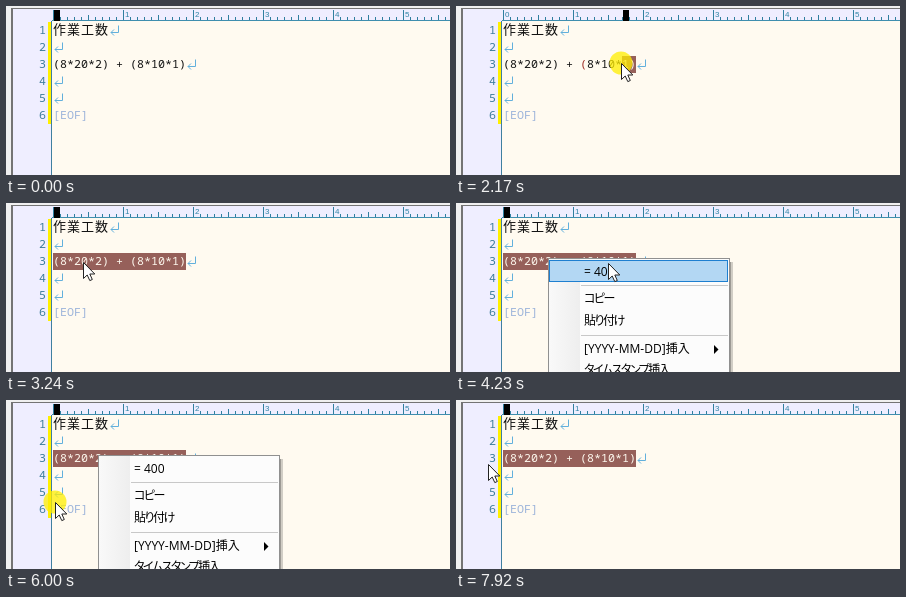
Write an HTML page that moves like this. It is 444 px wide and 169 px high and loops after 8000 ms.

```html
<!DOCTYPE html>
<html lang="ja">
<meta charset="utf-8">
<title>Editor calculation</title>
<style>
  html, body { margin: 0; width: 100%; height: 100%; overflow: hidden; }
  svg { display: block; width: 444px; height: 169px; }
  text { white-space: pre; }
  .code { font: 11.67px "Noto Sans Mono", "DejaVu Sans Mono", monospace; }
  .heading { font: 13px "Noto Sans CJK JP", sans-serif; letter-spacing: 1px; }
  .ruler { font: 8px "Liberation Sans", sans-serif; fill: #2f83a5; }
  .menu { font: 12px "Open Sans", "Noto Sans CJK JP", sans-serif; }
  .kana { font-feature-settings: "palt"; letter-spacing: -1.5px; }
</style>
<svg viewBox="0 0 444 169">
  <defs>
    <clipPath id="clip"><rect id="clipRect" y="50" height="17"/></clipPath>
    <linearGradient id="iconColumn">
      <stop stop-color="#f9f9f9"/><stop offset="1" stop-color="#eeeeee"/>
    </linearGradient>
    <path id="eol" d="M8.5-4.5V2.5H1M4-.5L1 2.5L4 5.5" fill="none" stroke="#62b0dc"/>
  </defs>

  <rect width="444" height="169" fill="#f0f0f0"/>
  <rect x="5" y="2" width="439" height="167" fill="#747474"/>
  <rect x="7" y="3" width="437" height="166" fill="#efeeff"/>
  <rect x="46" y="15" width="398" height="154" fill="#fffaf0"/>
  <rect x="42" y="16" width="3" height="102" fill="#fff000"/>
  <rect x="45" y="15" width="1" height="154" fill="#3f7f9f"/>
  <g id="ruler"></g>
  <rect id="column" y="4" width="6" height="11"/>

  <g id="lines" class="code"></g>
  <rect id="underline" x="47" width="397" height="1" fill="#96605a"/>
  <rect id="selection" y="50" height="17" fill="#96605a"/>
  <text class="code" x="47" y="62" fill="#fffaf0" clip-path="url(#clip)">(8*20*2) + (8*10*1)</text>
  <rect id="caret" width="2" height="15"/>

  <g id="menu" class="menu">
    <path d="M96 59H277V169H96Z" fill="#000" opacity=".18"/>
    <path d="M96 59H275V169H96Z" fill="#000" opacity=".25"/>
    <rect x="92.5" y="55.5" width="181" height="130" fill="#fcfcfc" stroke="#909090"/>
    <rect x="93" y="56" width="31" height="113" fill="url(#iconColumn)"/>
    <path d="M125 82.5H272M125 132.5H272" stroke="#c8c8c8"/>
    <rect id="hover" x="93.5" width="178" fill="#b3d7f3" stroke="#1e7fd0"/>
    <text x="128" y="73">= 400</text>
    <text x="128" y="100" class="kana">コピー</text>
    <text x="128" y="122" class="kana">貼り付け</text>
    <text x="128" y="150">[YYYY-MM-DD]挿入</text>
    <text x="128" y="171" class="kana">タイムスタンプ挿入</text>
    <path d="M258 142L262.5 146.5L258 151Z"/>
  </g>

  <g id="pointer">
    <circle id="click" r="11.5" fill="#ffee00" opacity=".75"/>
    <path id="arrow" d="M.5.5V16.5L4.2 13L6.8 18.6L9.3 17.5L6.8 12H11.8Z" fill="#fff" stroke="#222"/>
    <path id="beam" d="M-3-7.5H3M0-7.5V7.5M-3 7.5H3" fill="none" stroke="#111" stroke-width="1.4"/>
  </g>
</svg>
<script>
const $ = id => document.getElementById(id);
const set = (id, attrs) => {
  for (const name in attrs) $(id).setAttribute(name, attrs[name]);
};
const show = (id, on) => set(id, { visibility: on ? "visible" : "hidden" });

const LEFT = 47, CELL = 7, PITCH = 17, END = LEFT + 19 * CELL;
const TICK = 1000 / 13, TICKS = 104;

// Ruler
let ruler = `<path d="M46 14.5H444" stroke="#3f8eae"/>`;
for (let col = 0; LEFT + col * CELL < 444; col++) {
  const x = LEFT + col * CELL, major = col % 10 === 0;
  const top = major ? 4 : col % 5 ? 11 : 9;
  ruler += `<path d="M${x + .5} ${top}V14" stroke="#2f7f9f"/>`;
  if (major) ruler += `<text class="ruler" x="${x + 2}" y="11">${col / 10}</text>`;
}
$("ruler").innerHTML = ruler;

// Document: text and its width in pixels
const lines = [
  [`<tspan class="heading">作業工数</tspan>`, 56], ["", 0],
  [`(8*20*2) + <tspan id="bracket">(</tspan>8*10*1)`, END - LEFT],
  ["", 0], ["", 0], ["[EOF]"]
];
$("lines").innerHTML = lines.map(([text, width], i) => {
  const y = 11 + PITCH * (i + 1), last = width === undefined;
  return `<text x="40" y="${y}" text-anchor="end" fill="#3d7c9c">${i + 1}</text>
    <text x="${LEFT}" y="${y}" fill="${last ? "#9db4da" : "#111"}">${text}</text>` +
    (last ? "" : `<use href="#eol" x="${LEFT + width + 1}" y="${y - 4}"/>`);
}).join("");

// Pointer path: tick, x, y
const path = [
  [2, 348, 168], [8, 348, 168], [16, 132, 72], [19, 186, 62], [20, 203, 58],
  [25, 203, 58], [26, 196, 58], [28, 165, 57], [36, 45, 58], [37, 34, 58],
  [39, 34, 58], [42, 77, 59], [43, 92, 57], [53, 92, 57], [55, 152, 60],
  [57, 201, 70], [58, 201, 70], [59, 204, 70], [60, 204, 70], [65, 150, 76],
  [69, 204, 64], [73, 204, 64], [78, 49, 102], [84, 50, 101], [91, 195, 53],
  [92, 200, 58], [93, 200, 58], [100, 27, 63], [102, 27, 63], [103, 32, 64]
];
const menuItems = [[57, 79], [86, 107], [107, 129]];

function pointerAt(tick) {
  const next = path.findIndex(key => key[0] >= tick);
  if (next < 1) return path[0].slice(1);
  const [t0, x0, y0] = path[next - 1], [t1, x1, y1] = path[next];
  const k = (tick - t0) / (t1 - t0);
  return [Math.round(x0 + (x1 - x0) * k), Math.round(y0 + (y1 - y0) * k)];
}

function draw(tick) {
  const within = (from, to) => tick >= from && tick < to;
  const [x, y] = pointerAt(tick);

  // Selection grows leftwards while dragging, or takes the whole line
  let start = END;
  if (within(26, 37)) {
    const col = Math.round((x - LEFT) / CELL);
    start = LEFT + Math.max(0, Math.min(19, col)) * CELL;
  } else if (within(37, 80) || tick >= 99) start = LEFT;
  const selected = start < END;
  for (const id of ["selection", "clipRect"]) set(id, { x: start, width: END - start });

  const onLine3 = within(24, 80), onLine5 = within(80, 99);
  set("column", { x: (onLine3 ? start : LEFT) + 1 });
  set("bracket", { fill: within(24, 29) ? "#a03028" : "#111" });
  show("underline", onLine5 || onLine3 && !selected);
  set("underline", { y: onLine5 ? 100 : 66 });

  show("caret", within(24, 27) || within(46, 50) || within(57, 64) ||
    within(71, 78) || within(80, 87) || within(94, 99));
  set("caret", {
    x: onLine3 ? start : LEFT,
    y: onLine5 ? 85 : 51,
    fill: selected ? "#69a0a5" : "#000"
  });

  // Context menu
  const open = within(51, 80);
  const item = open && tick > 53 && x >= 92 && menuItems.find(([a, b]) => y >= a && y < b);
  show("menu", open);
  show("hover", item);
  if (item) set("hover", { y: item[0] + .5, height: item[1] - item[0] - 1 });

  // Pointer
  const visible = tick >= 2;
  const beam = x >= 46 && (tick < 27 || tick >= 80);
  set("pointer", { transform: `translate(${x} ${y})` });
  show("beam", visible && beam);
  show("arrow", visible && !beam);
  show("click", within(24, 40) || within(49, 51) || within(78, 83) || within(99, 103));
}

const origin = performance.now();
function frame() {
  const time = (performance.now() - origin) % (TICKS * TICK);
  draw(Math.floor(time / TICK + .05) % TICKS);
  requestAnimationFrame(frame);
}
frame();
</script>
</html>
```
